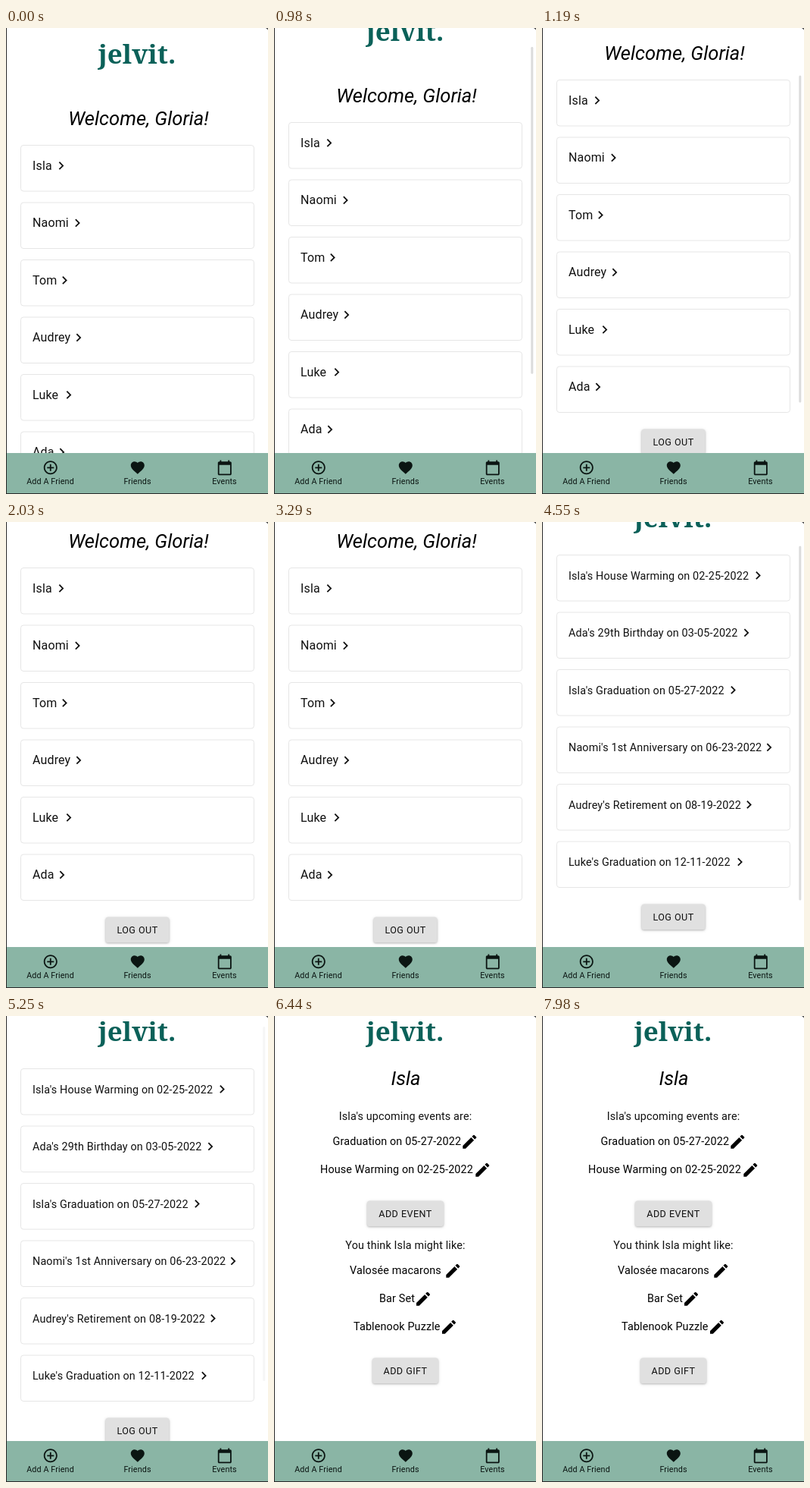
Animation of 346x614 px, one loop 8 s. Source, as an HTML page:

```html
<!DOCTYPE html>
<html lang="en">
<head>
<meta charset="utf-8">
<title>Gift list</title>
<style>
  html, body { margin: 0; width: 100%; height: 100%; overflow: hidden; background: #fff; }
  svg { display: block; width: 346px; height: 614px; }
  text { font: 14.4px Roboto, sans-serif; letter-spacing: .00938em; fill: #111; }
  .mid { text-anchor: middle; }
  .name { font-size: 16px; }
  .item { fill: #000; }
  .head { font-size: 25.6px; font-style: italic; letter-spacing: 0; fill: #000; }
  .brand { font: 900 35px "Noto Serif", serif; letter-spacing: 0; fill: #0b6159; }
  .label { font-size: 10.8px; fill: #0b1512; }
  .cta { font-size: 12.6px; letter-spacing: .035em; }
  .card { fill: #fff; stroke: #e6e6e6; }
  .btn { fill: #e0e0e0; filter: drop-shadow(0 1.5px 1px rgba(0,0,0,.2)) drop-shadow(0 1px 2px rgba(0,0,0,.12)); }
</style>
</head>
<body>
<svg id="stage" viewBox="0 0 346 614" xmlns="http://www.w3.org/2000/svg"></svg>
<script>
const PATHS = {
  next: "M10 6 8.59 7.41 13.17 12l-4.58 4.59L10 18l6-6z",
  edit: "M3 17.25V21h3.75L17.81 9.94l-3.75-3.75L3 17.25zM20.71 7.04c.39-.39.39-1.02 0-1.41l-2.34-2.34a1 1 0 0 0-1.41 0l-1.83 1.83 3.75 3.75 1.83-1.83z",
  add: "M13 7h-2v4H7v2h4v4h2v-4h4v-2h-4V7zm-1-5C6.48 2 2 6.48 2 12s4.48 10 10 10 10-4.48 10-10S17.52 2 12 2zm0 18c-4.41 0-8-3.59-8-8s3.59-8 8-8 8 3.59 8 8-3.59 8-8 8z",
  heart: "M12 21.35l-1.45-1.32C5.4 15.36 2 12.28 2 8.5 2 5.42 4.42 3 7.5 3c1.74 0 3.41.81 4.5 2.09C13.09 3.81 14.76 3 16.5 3 19.58 3 22 5.42 22 8.5c0 3.78-3.4 6.86-8.55 11.54L12 21.35z",
  day: "M20 3h-1V1h-2v2H7V1H5v2H4c-1.1 0-2 .9-2 2v16c0 1.1.9 2 2 2h16c1.1 0 2-.9 2-2V5c0-1.1-.9-2-2-2zm0 18H4V8h16v13z"
};
const FRIENDS = [["Isla", 73], ["Naomi", 94.5], ["Tom", 77.5], ["Audrey", 96], ["Luke", 83], ["Ada", 74]];
const EVENTS = [
  ["Isla's House Warming on 02-25-2022", 285.5],
  ["Ada's 29th Birthday on 03-05-2022", 270],
  ["Isla's Graduation on 05-27-2022", 252.5],
  ["Naomi's 1st Anniversary on 06-23-2022", 300],
  ["Audrey's Retirement on 08-19-2022", 273.5],
  ["Luke's Graduation on 12-11-2022", 261.5]
];
// text, left, baseline, pencil centre
const ITEMS = [
  ["Graduation on 05-27-2022", 77.5, 170, 258.3],
  ["House Warming on 02-25-2022", 61, 207, 275.3],
  ["Valosée macarons", 100, 340, 236.3],
  ["Bar Set", 139, 377, 197],
  ["Tablenook Puzzle", 105, 414, 231]
];

const text = (s, x, y, cls = "") => `<text x="${x}" y="${y}" class="${cls}">${s}</text>`;
const icon = (id, x, y, size, fill = "#111") =>
  `<path d="${PATHS[id]}" fill="${fill}" transform="translate(${x - size / 2} ${y - size / 2}) scale(${size / 24})"/>`;
const button = (s, x, y, w) =>
  `<rect class="btn" x="${x}" y="${y}" width="${w}" height="33.5" rx="3.6"/>` + text(s, 173.5, y + 21.5, "mid cta");
const brand = text("jelvit.", 173, 46.5, "mid brand");

function list(rows, top, cls) {
  return rows.map(([s, x], i) => {
    const y = top + i * 75.5;
    return `<rect class="card" x="19.5" y="${y}" width="308" height="60.5" rx="3.6"/>` +
      text(s, 35, y + 32.2, cls) + icon("next", x - .2, y + 26.9, 21.6);
  }).join("");
}

const friends = brand + text("Welcome, Gloria!", 175, 127.5, "mid head") +
  list(FRIENDS, 154.5, "name") + button("LOG OUT", 131.5, 614.5, 84);
const events = brand + list(EVENTS, 83.5, "") + button("LOG OUT", 131.5, 543.5, 84);
const detail = `<g transform="translate(0 -14)">${brand}</g>` +
  text("Isla", 174, 91.3, "mid head") +
  text("Isla's upcoming events are:", 173.5, 137, "mid") +
  text("You think Isla might like:", 173.5, 307, "mid") +
  ITEMS.map(([s, x, y, p]) => text(s, x, y, "item") + icon("edit", p, y - 4.3, 24, "#000")).join("") +
  button("ADD EVENT", 123, 243.5, 101) + button("ADD GIFT", 130, 450.5, 87);
const nav = `<rect x="0" y="560" width="346" height="54" fill="#8ab5a5"/>` +
  [["add", "Add A Friend", 58.5], ["heart", "Friends", 173.5], ["day", "Events", 288.5]]
    .map(([id, s, x]) => icon(id, x + .3, 579.3, 21.6, "#0b1512") + text(s, x, 601, "mid label")).join("");

const stage = document.getElementById("stage");
stage.innerHTML = `<rect width="346" height="614" fill="#fff"/>
  <g id="friends">${friends}</g><g id="events">${events}</g><g id="detail">${detail}</g>
  <rect id="thumb" x="339.3" width="3" rx="1.5" fill="#dcdcdc"/>${nav}
  <path d="M0 0h1v614h-1zM0 613h346v1h-346z" fill="#2a2a2a"/>
  <path d="M343 0h3v2.5z" fill="#555"/>`;
const [friendsEl, eventsEl, detailEl, thumb] =
  ["friends", "events", "detail", "thumb"].map(id => document.getElementById(id));

const LOOP = 8000, TICK = 70, TO_EVENTS = 3360, TO_DETAIL = 6440;
const SCROLL = [[0, 0], [840, 0], [910, 8], [980, 30], [1050, 55], [1120, 74], [1190, 86], [1260, 91], [1400, 94],
  [3290, 94], [3360, 14], [4270, 14], [4340, 32], [4410, 44], [4480, 44], [4550, 40], [4620, 26], [4690, 18], [4760, 14]];
const BAR = [[0, 0], [840, 0], [910, 1], [1540, 1], [1680, 0], [4270, 0], [4340, 1], [5110, 1], [5180, .6], [5250, .25]];

function at(steps, t) {
  const i = steps.findIndex(s => s[0] > t);
  if (i < 0) return steps[steps.length - 1][1];
  const [t0, a] = steps[i - 1], [t1, b] = steps[i];
  return a + (b - a) * (t - t0) / (t1 - t0);
}

function draw(ms) {
  const t = Math.floor((ms % LOOP) / TICK) * TICK;
  const page = t < TO_EVENTS ? friendsEl : t < TO_DETAIL ? eventsEl : detailEl;
  for (const el of [friendsEl, eventsEl, detailEl]) el.style.display = el === page ? "" : "none";
  const y = at(SCROLL, t);
  if (page !== detailEl) page.setAttribute("transform", `translate(0 ${-y})`);
  thumb.setAttribute("y", 4.5 + y * .675);
  thumb.setAttribute("height", page === friendsEl ? 431 : 467);
  thumb.setAttribute("opacity", page === detailEl ? 0 : at(BAR, t));
}

const start = performance.now();
function loop() {
  draw(performance.now() - start);
  requestAnimationFrame(loop);
}
loop();
</script>
</body>
</html>
```
